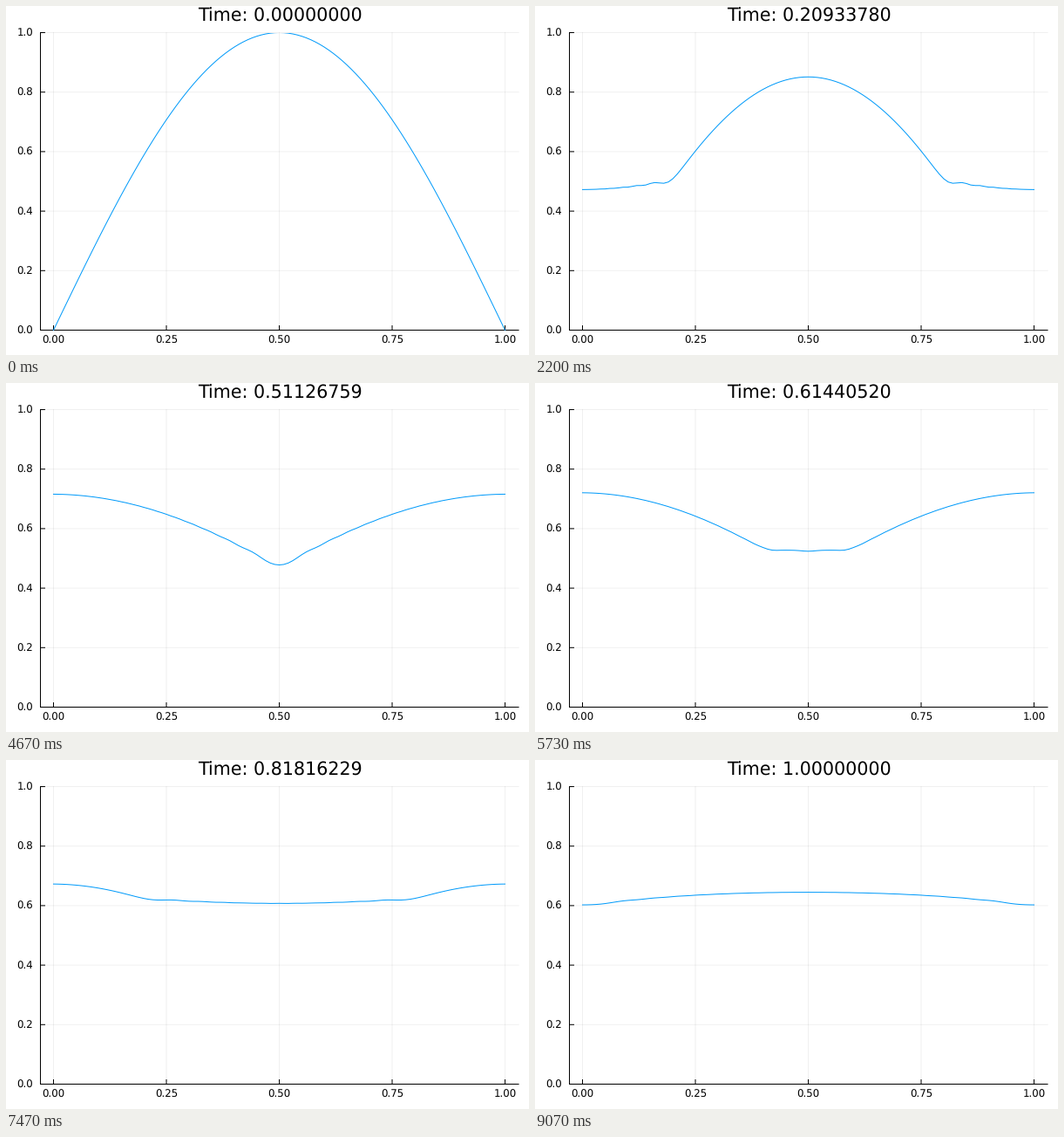
Recreate the animation shown at these times as a matplotlib script. Size 600 by 400 pixels, loop 9.14 s.

```python
import numpy as np
import matplotlib.pyplot as plt
from matplotlib.animation import FuncAnimation

plt.rcParams["text.hinting"] = "no_hinting"

W, H, DPI = 600, 400, 100
PX = 72 / DPI  # one pixel in points
LEFT, RIGHT, TOP, BOTTOM = 39.5, 588, 30.5, 371.5
TICK_MS, LOOP_MS = 20, 9140
STEPS_PER_MS = 0.015  # the picture changes 15 times a second

# Damped wave u_tt + 2a u_t = c^2 u_xx on a grid with reflecting ends
N, SPEED, DAMP = 101, 0.99, 2.5
grid = np.linspace(0, 1, N)
mode = np.arange(N)
basis = np.cos(np.pi * np.outer(mode + 0.5, mode) / N)
coef = basis.T @ np.sin(np.pi * grid) * 2 / N
coef[0] /= 2
omega = 2 * SPEED * (N - 1) * np.sin(np.pi * mode / (2 * N))
freq = np.sqrt(np.maximum(omega**2 - DAMP**2, 1e-9))

# Key points (step, time) of the uneven solver steps after the slow start
KEYS = [(33, 0.20933780), (54, 0.40812997), (86, 0.61440520),
        (101, 0.72625404), (124, 0.91842583), (136, 1.0)]


def px(x):
    return 54.5 + 518 * x


def py(y):
    return BOTTOM - (BOTTOM - TOP) * y


def solver_time(step):
    first, t_first = KEYS[0]
    if step < first:
        s = step / first
        return t_first * s**3 * (2.6 - 1.6 * s)
    return np.interp(step, *zip(*KEYS))


def wave(t):
    decay = np.exp(-DAMP * t) * (np.cos(freq * t) + DAMP / freq * np.sin(freq * t))
    decay[0] = 1
    return basis @ (coef * decay)


fig = plt.figure(figsize=(W / DPI, H / DPI), dpi=DPI, facecolor="white")
ax = fig.add_axes([0, 0, 1, 1])
ax.set_xlim(0, W)
ax.set_ylim(H, 0)
ax.axis("off")


def stroke(xs, ys, color="black", **kw):
    return ax.plot(xs, ys, color=color, lw=PX, snap=False, **kw)[0]


def label(x, y, s, size, ha):
    return ax.text(x, y, s, fontsize=size * PX, ha=ha, va="baseline",
                   family="DejaVu Sans", color="black")


for v in np.linspace(0, 1, 5):
    stroke([px(v)] * 2, [TOP, BOTTOM], alpha=0.06, zorder=1)
    stroke([px(v)] * 2, [BOTTOM, BOTTOM - 5], zorder=2)
    label(px(v) + 0.3, 387, f"{v:.2f}", 11.8, "center")

for v in np.linspace(0, 1, 6):
    stroke([LEFT, RIGHT], [py(v)] * 2, alpha=0.06, zorder=1)
    stroke([LEFT, LEFT + 5], [py(v)] * 2, zorder=2)
    label(31, py(v) + 4.3, f"{v:.1f}", 11.8, "right")

stroke([LEFT, LEFT, RIGHT], [TOP, BOTTOM, BOTTOM], zorder=2)

curve = stroke(px(grid), py(wave(0)), "#009AFA", zorder=3)
curve.set_clip_path(plt.Rectangle((LEFT, TOP), RIGHT - LEFT, BOTTOM - TOP,
                                  transform=ax.transData))
title = label(314.3, 18, "", 20.7, "center")


def update(i):
    t = solver_time(int(i * TICK_MS * STEPS_PER_MS + 0.25))
    curve.set_ydata(py(wave(t)))
    title.set_text(f"Time: {t:.8f}")
    return curve, title


anim = FuncAnimation(fig, update, frames=LOOP_MS // TICK_MS,
                     init_func=lambda: update(0), interval=TICK_MS,
                     repeat=True, repeat_delay=0)
plt.show()
```
